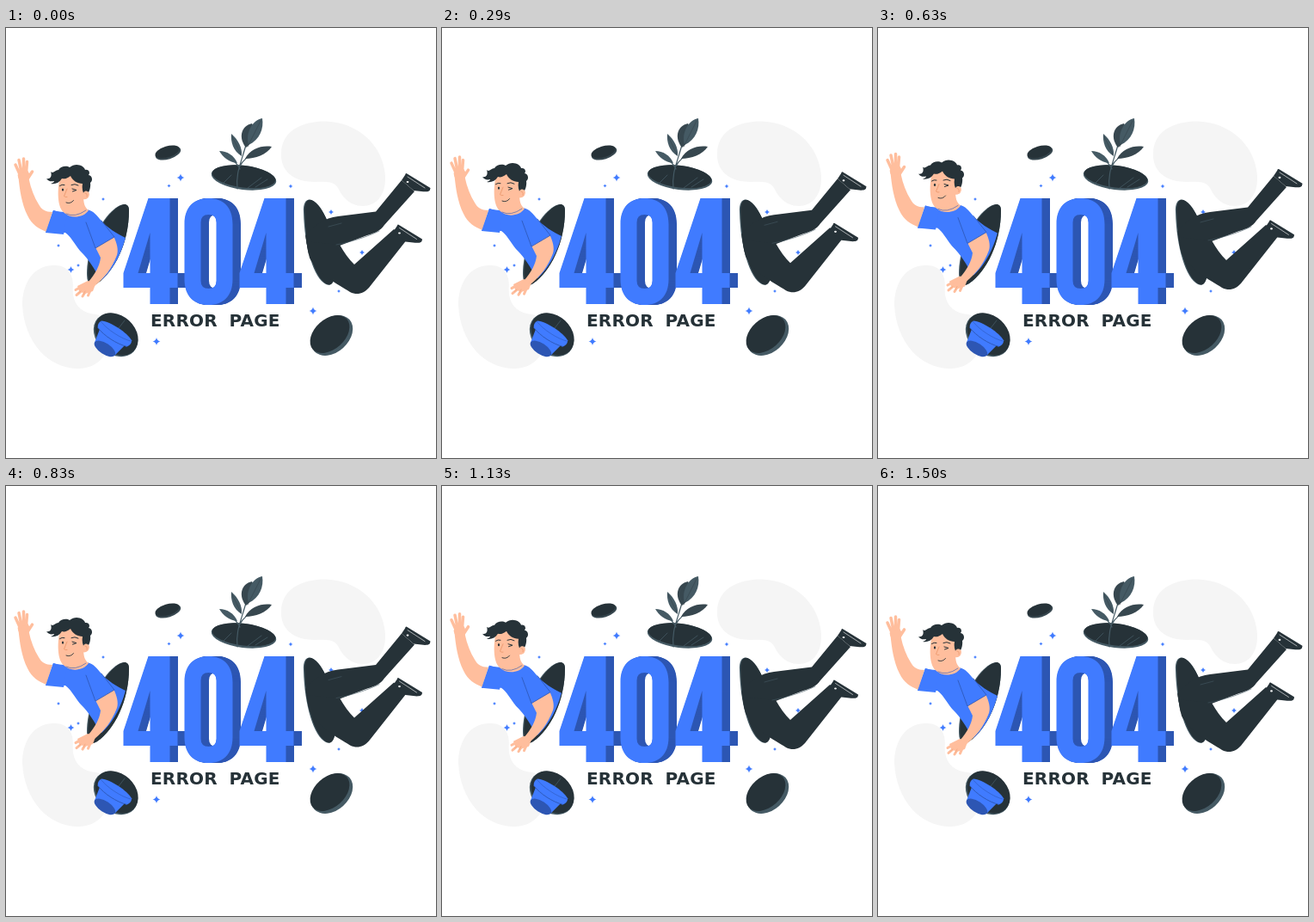
Write an HTML page with a canvas that moves like this. It is 500 by 500 pixels and loops after 1540 ms.

```html
<!DOCTYPE html>
<html lang="en">
<head>
<meta charset="utf-8">
<title>404</title>
<style>
html, body { margin: 0; width: 100%; height: 100%; overflow: hidden; background: #fff; }
canvas { display: block; width: 500px; height: 500px; }
</style>
</head>
<body>
<canvas id="stage" width="500" height="500"></canvas>
<script>
const ctx = document.getElementById('stage').getContext('2d');
const LOOP = 1540;
const BLUE = '#407bff', SHADE = '#2d56b3', DARK = '#263238', RIM = '#37474f', GREY = '#455a64',
  SKIN = '#ffbe9d', SKIN_LINE = '#eb996e', PALE = '#f5f5f5';

function fill(d, color, rule = 'nonzero') {
  ctx.fillStyle = color;
  ctx.fill(new Path2D(d), rule);
}
function line(d, color, width = 1) {
  ctx.strokeStyle = color;
  ctx.lineWidth = width;
  ctx.lineCap = ctx.lineJoin = 'round';
  ctx.stroke(new Path2D(d));
}
function oval(x, y, rx, ry, degrees, color) {
  ctx.fillStyle = color;
  ctx.beginPath();
  ctx.ellipse(x, y, rx, ry, degrees * Math.PI / 180, 0, 7);
  ctx.fill();
}
function placed(x, y, draw, degrees = 0) {
  ctx.save();
  ctx.translate(x, y);
  ctx.rotate(degrees * Math.PI / 180);
  draw();
  ctx.restore();
}
function sparkle(x, y, r) {
  const k = r * 0.18;
  placed(x, y, () => fill(`M0 ${-r}Q${k} ${-k} ${r} 0Q${k} ${k} 0 ${r}Q${-k} ${k} ${-r} 0Q${-k} ${-k} 0 ${-r}Z`, BLUE));
}

// Solid digit: the shaded side is swept to the right of the face
const DEPTH = 9.5;
function digit(x, face) {
  for (let i = DEPTH; i >= 0; i -= 0.5) placed(x + i, 198, () => fill(face, i ? SHADE : BLUE, 'evenodd'));
}
const FOUR = 'M29 0H54V87H63V104H54V123H31V104H0V87ZM31 87V40L17 87Z';
const ZERO = 'M0 30C0 10 11 0 28 0S56 10 56 30V94C56 114 45 124 28 124S0 114 0 94ZM19 28V96Q19 105 28 105T37 96V28Q37 19 28 19T19 28Z';

const LEFT_HOLE = 'M143 212C143 202 133 202 120 216C104 234 94 262 94 285C94 298 98 302 106 297C126 283 143 250 143 212Z';
const RIGHT_HOLE = 'M346 214C345 198 354 195 363 206C375 220 384 250 383 280C383 295 379 301 372 298C358 291 347 255 346 214Z';

function scenery() {
  fill('M320 145C321 119 345 108.5 371 108.5C409 109 439 137 441 172C442 195 430 207 415 207C398 207 390 194 386 186C379 174 360 182 343 177C327 172 319 160 320 145Z', PALE);
  fill('M57 276C31 275 19 298 19 322C21 364 48 396 84 396C106 396 121 380 122 356C121 341 113 334 105 333C90 332 80 324 78 310C77 302 79 296 76 288C73 280 66 276 57 276Z', PALE);
  [[203, 174, 4.5], [189.5, 183.5, 2], [331, 184, 2.5], [113, 199, 2], [61, 253, 2], [75.5, 281, 4],
    [84, 276, 2], [378, 214, 3], [414, 261, 3], [387, 306, 2], [357, 329, 4.5], [175, 364.5, 4.5]]
    .forEach(s => sparkle(...s));

  oval(188.5, 145.5, 15.2, 7, -17, RIM);
  oval(187.5, 144, 14.5, 6.5, -17, DARK);
  oval(379, 357.5, 27.5, 19.5, -42, GREY);
  oval(376.5, 356, 26.5, 17.5, -42, DARK);
}

function plant() {
  oval(276.5, 174, 38, 14, 7, GREY);
  oval(276.5, 172.8, 37, 12.8, 7, DARK);
  line('M252 181L262 171M281 186L297 174M290 185L304 176', GREY, 0.8);
  line('M269 187C267 168 273 158 279 136M272 164C269 157 260 150 255 147M271 162C276 152 285 146 296 141', GREY, 1.2);
  fill('M279 139C270 128 273 114 286 111C292 120 288 132 279 139Z', RIM);
  fill('M282 136C278 121 287 107 298 105C300 117 295 130 282 136Z', GREY);
  fill('M274 149C264 143 261 132 262 123C270 130 275 139 274 149Z', GREY);
  fill('M269 157C259 156 252 150 248 143C257 143 265 148 269 157Z', GREY);
  fill('M278 152C284 140 298 136 309 138C303 147 290 152 278 152Z', RIM);
  line('M281 138L296 108M273 147L263 126', RIM, 0.7);
}

function pot() {
  oval(127.5, 357, 28.5, 22, 43, GREY);
  oval(128.5, 356, 28, 21.5, 43, DARK);
  line('M131 349L138 340', GREY, 0.8);
  placed(122, 362, () => {
    fill('M-18 -6L-14 13C-8 20 8 20 14 13L18 -6Z', BLUE);
    oval(0, 13, 14, 6.5, 0, SHADE);
    fill('M-21 -12C-12 -17 12 -17 21 -12C23 -9 22 -5 20 -3C9 1 -9 1 -20 -3C-22 -5 -23 -9 -21 -12Z', BLUE);
    line('M-20 -3C-9 1 9 1 20 -3', SHADE, 0.8);
    line('M-21 -11C-10 -7 10 -7 21 -11', SHADE, 0.5);
  }, 33);
}

function title() {
  digit(136.5, FOUR);
  digit(207.5, ZERO);
  digit(271.5, FOUR);
  ctx.fillStyle = DARK;
  ctx.font = 'bold 20px "DejaVu Sans", sans-serif';
  ctx.letterSpacing = '0.2px';
  ctx.fillText('ERROR', 168, 347);
  ctx.fillText('PAGE', 259.5, 347);
}

function head() {
  fill('M70 202L90 194C90 203 91 208 96 212C90 221 75 222 68 215Z', SKIN);
  fill('M62 177C59 195 61 212 69 215.5C78 218 87 208 89 199C96 201 99 192 94 189L91 173L70 167Z', SKIN);
  fill('M47 175C51 176 54 173 52 167C55 170 57 165 61 165C64 160 71 160 74 162C81 156 91 160 92 165C97 164 98 169 96 171C101 172 101 178 98 180C99 186 96 193 92 196C89 191 88 186 89 181C83 181 77 177 75 172C71 175 68 176 65 175C62 180 57 182 52 181C55 180 56 179 56 178C52 179 49 178 47 175Z', DARK);
  oval(93, 194, 3.6, 4.5, 15, SKIN);
  oval(66, 188, 1.1, 1.6, 0, DARK);
  line('M62.5 183.5Q65 181.5 68 182.5M76 182.5Q80 180.5 84 183M77 187L82 188.5L77.5 190', DARK, 1);
  line('M71 187L67.5 195.5Q69 197 71 196.5', SKIN_LINE, 0.9);
  line('M70 203Q75 205 78.5 200.5', DARK, 0.9);
  line('M92 192Q95 192 94 196', SKIN_LINE, 0.8);
}

function man() {
  ctx.save();
  ctx.clip(new Path2D('M0 0H143V212H0Z M0 200H130L143 212C143 250 126 283 106 297L90 330H0Z'));
  fill('M55 212C66 216 80 213 92 211C100 211 104 216 109 222C118 233 129 239 141 245L138 264L118 300L108 290C103 280 97 270 86 259C79 250 75 242 69 238L46 238Z', BLUE);
  ctx.restore();

  fill('M14.5 174C16 188 18 204 25 218C30 229 38 233 47 237L54 214C46 214 41 211 38 205C33 197 29 187 26.5 175Z', SKIN);
  oval(20.5, 171.5, 6.8, 7.5, 0, SKIN);
  line('M16 170L11 159M18 168L15 153.5M20.5 167L20.5 152M23.5 168L24.5 155.5M24 177L30.5 167', SKIN, 3.5);
  fill('M55 212L71 216L67 240L46 238Z', BLUE);
  head();

  fill('M103 253L125 242C129 250 131 258 129 264C123 280 114 291 103 300L95 296C104 286 109 276 110 267Z', SKIN);
  fill('M95 294L104 298L101 306L92 309L85 306L83 300Z', SKIN);
  line('M91 299L81 304.5M91 303L82 310.5M94 304L89 312M99 303L95.5 311', SKIN, 3);
  line('M87 306L84 308.5M92 306L90 310', SKIN_LINE, 0.5);
  fill('M94 226C98 216 107 219 112 227L126 243L104 256Z', BLUE);
  line('M93 226L104 256L126 243L111 224', SHADE, 0.8);
  line('M70 216Q80 221 93 212', SHADE, 0.6);
}

function shoe() {
  fill('M460 177L465 169.5L493 187C494 190 489 191 483 190L474 189Z', DARK);
  line('M465.5 170L492.5 186.5', DARK, 2);
  line('M467 173L487 186', '#fff', 0.6);
  oval(467, 179, 1.4, 1.1, 0, '#fff');
}

function legs() {
  ctx.save();
  ctx.clip(new Path2D('M346 150H500V330H372C358 291 347 255 346 214Z'));
  fill('M345 245C358 229 370 221 386 219L430 213.5L460 177L475 190L440 229C435 236 430 238 420 241L388 253L345 265Z', DARK);
  fill('M345 248L388 252C393 261 399 269 405 275L451 234L467 245L422 302C416 309 408 311 400 307C385 297 362 287 350 262Z', DARK);
  line('M384 252C400 249 420 243 434 236M375 231L390 227', GREY, 0.6);
  shoe();
  placed(-9.5, 59.5, shoe);
  ctx.restore();
}

function hole(shape, dx) {
  fill(shape, GREY);
  ctx.save();
  ctx.clip(new Path2D(shape));
  placed(dx, 0, () => fill(shape, DARK));
  ctx.restore();
}

function draw(now) {
  const lift = (1 - Math.cos(now / LOOP * 2 * Math.PI)) / 2;
  ctx.fillStyle = '#fff';
  ctx.fillRect(0, 0, 500, 500);
  scenery();
  plant();
  pot();
  hole(LEFT_HOLE, 1.2);
  hole(RIGHT_HOLE, 1.2);
  title();
  placed(0, -6 * lift, man);
  placed(0, -5.5 * lift, legs);
}

const start = performance.now();
function tick() {
  draw((performance.now() - start) % LOOP);
  requestAnimationFrame(tick);
}
tick();
</script>
</body>
</html>
```
